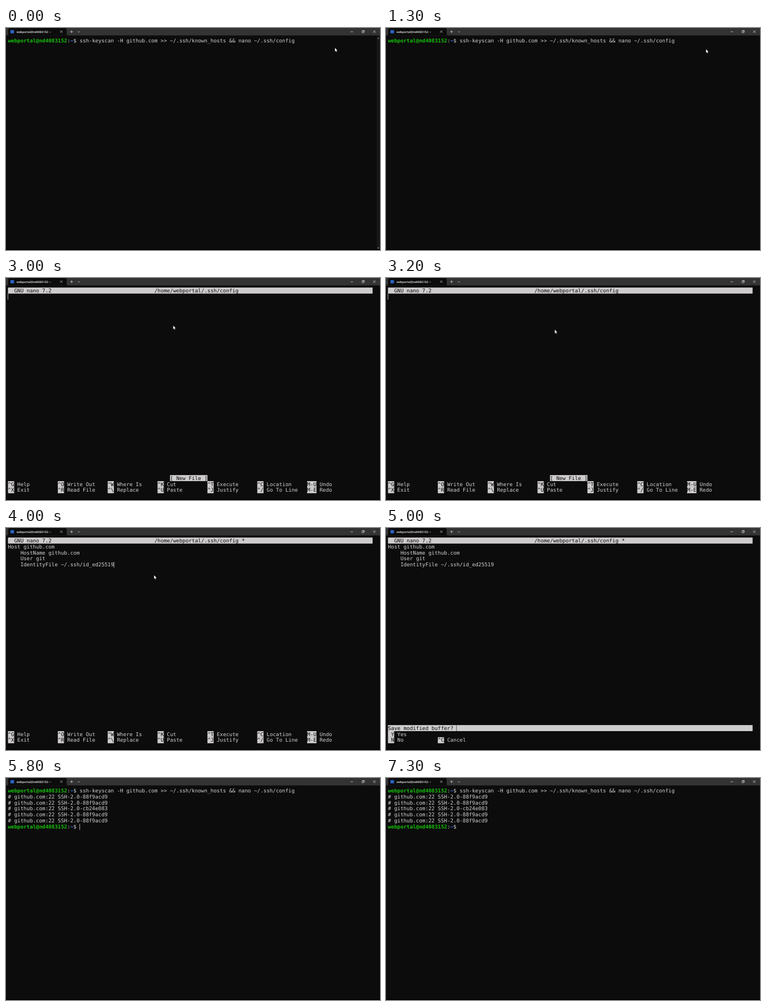
Recreate the animation shown at these times as an HTML page. Size 672 by 400 pixels, loop 8000 ms.

```html
<!DOCTYPE html>
<html lang="en">
<head>
<meta charset="utf-8">
<title>Terminal</title>
<style>
  html, body { margin: 0; width: 100%; height: 100%; overflow: hidden; background: #0c0c0c; }
  svg { display: block; width: 672px; height: 400px; }
  text { white-space: pre; text-rendering: geometricPrecision; }
  #screen text { font: 9.3015px "DejaVu Sans Mono", monospace; font-variant-ligatures: none; }
  #screen .bold { font-weight: 700; }
  #title { font: 600 5.1px "Open Sans", sans-serif; }
  .icon { fill: none; stroke: #e6e6e6; stroke-width: .7; }
</style>
</head>
<body>
<svg viewBox="0 0 672 400">
  <rect width="672" height="400" fill="#0c0c0c"/>
  <rect y="398.5" width="672" height="1.5" fill="#000"/>
  <rect width="672" height="13.4" fill="#333"/>
  <path d="M1 13.4Q4 13.4 4 10.4V3Q4 0 7 0H106Q109 0 109 3V10.4Q109 13.4 112 13.4Z" fill="#0c0c0c"/>
  <rect x="8" y="3.8" width="6.4" height="5.8" fill="#2b64c4"/>
  <text id="title" x="19" y="8.7" fill="#fff"></text>
  <path class="icon" d="M97.4 4.6l4 4m0-4l-4 4M115.3 6.7h5m-2.5-2.5v5M129.2 6l1.8 1.8 1.8-1.8M619 6.8h4.6M639.6 5.4h3.2v3.2h-3.2zM640.8 5.2v-.8h3v3h-.8M659.6 4.4l4.4 4.4m0-4.4l-4.4 4.4"/>
  <g id="bar">
    <rect x="666" y="13.4" width="6" height="385" fill="#171717"/>
    <path d="M667.3 19.4l1.7-2.4 1.7 2.4zM667.3 395.6l1.7 2.4 1.7-2.4z" fill="#8a8a8a"/>
  </g>
  <g id="screen"></g>
  <path id="mouse" d="M0 0V6.7L1.5 5.3 2.5 7.7 3.6 7.2 2.6 4.9H4.7Z" fill="#fff" stroke="#222" stroke-width=".25"/>
</svg>
<script>
const LOOP = 8000, STEP = 100;
const LEFT = 3.5, TOP = 17.2, CELL = 5.6, ROW = 10.9, COLS = 117;
const FG = '#d2d2d2', BG = '#0c0c0c', PANEL = '#cfccce', GREEN = '#16c00c', BLUE = '#3b78ff';
const USER = 'webportal', HOST = 'nd4083152';
const FILE = `/home/${USER}/.ssh/config`;
const COMMAND = 'ssh-keyscan -H github.com >> ~/.ssh/known_hosts && nano ~/.ssh/config';

const $ = id => document.getElementById(id);
const screen = $('screen'), mouse = $('mouse'), bar = $('bar');
$('title').textContent = `${USER}@${HOST}: ~`;

function add(tag, attrs, content = '') {
  const el = document.createElementNS('http://www.w3.org/2000/svg', tag);
  for (const name in attrs) el.setAttribute(name, attrs[name]);
  el.textContent = content;
  screen.append(el);
}
const colX = col => LEFT + col * CELL;
const rowY = row => TOP + row * ROW;

function put(row, col, text, fill = FG, style = '') {
  add('text', { x: colX(col), y: rowY(row) + 8.5, fill, class: style }, text);
}
function fill(row, col, count) {
  add('rect', { x: colX(col), y: rowY(row), width: count * CELL, height: ROW, fill: PANEL });
}
function invert(row, col, text) {
  fill(row, col, text.length);
  put(row, col, text, BG);
}
function caret(row, col, color = FG) {
  add('rect', { x: colX(col) - .3, y: rowY(row), width: .8, height: ROW, fill: color });
}

function prompt(row) {
  put(row, 0, `${USER}@${HOST}`, GREEN, 'bold');
  put(row, 19, ':');
  put(row, 20, '~', BLUE, 'bold');
  put(row, 21, '$');
}
function shell(lines) {
  prompt(0);
  put(0, 23, COMMAND);
  for (let i = 1; i <= lines; i++)
    put(i, 0, '# github.com:22 SSH-2.0-' + (i === 3 ? 'cb24e083' : '88f9acd9'));
}

// Each entry: key and label, listed in column pairs.
function shortcuts(list, width) {
  list.forEach(([key, label], i) => {
    const row = 32 + i % 2, col = (i >> 1) * width;
    invert(row, col, key);
    put(row, col + key.length + 1, label);
  });
}
const EDIT_KEYS = [
  ['^G', 'Help'], ['^X', 'Exit'], ['^O', 'Write Out'], ['^R', 'Read File'],
  ['^W', 'Where Is'], ['^\\', 'Replace'], ['^K', 'Cut'], ['^U', 'Paste'],
  ['^T', 'Execute'], ['^J', 'Justify'], ['^C', 'Location'], ['^/', 'Go To Line'],
  ['M-U', 'Undo'], ['M-E', 'Redo']
];
const WRITE_KEYS = [
  ['^G', 'Help'], ['^C', 'Cancel'], ['M-D', 'DOS Format'], ['M-M', 'Mac Format'],
  ['M-A', 'Append'], ['M-P', 'Prepend'], ['M-B', 'Backup File'], ['^T', 'Browse']
];

function nano(edited) {
  fill(0, 0, COLS);
  put(0, 2, 'GNU nano 7.2', BG);
  put(0, 47, FILE + (edited ? ' *' : ''), BG);
  if (!edited) return;
  put(1, 0, 'Host github.com');
  put(2, 4, 'HostName github.com');
  put(3, 4, 'User git');
  put(4, 4, 'IdentityFile ~/.ssh/id_ed25519');
}
function ask(text) {
  fill(31, 0, COLS);
  put(31, 0, text, BG);
  caret(31, text.length, '#444');
}

const output = lines => () => { shell(lines); caret(lines + 1, 0); };
const finished = blink => () => { shell(5); prompt(6); if (blink) caret(6, 23); };

const SCENES = [
  [0, () => shell(0)],
  [1800, output(0)],
  [2000, output(1)],
  [2200, output(2)],
  [2300, output(3)],
  [2500, output(4)],
  [2600, output(5)],
  [3000, () => { nano(false); invert(31, 52, '[ New File ]'); shortcuts(EDIT_KEYS, 16); caret(1, 0); }],
  [4000, () => { nano(true); shortcuts(EDIT_KEYS, 16); caret(4, 34); }],
  [5000, () => {
    nano(true);
    ask('Save modified buffer? ');
    shortcuts([[' Y', 'Yes'], [' N', 'No']], 16);
    invert(33, 16, '^C');
    put(33, 19, 'Cancel');
  }],
  [5200, () => { nano(true); ask('File Name to Write: ' + FILE); shortcuts(WRITE_KEYS, 29); }],
  [5800, finished(true)],
  [7200, finished(false)]
];

// Pointer stops: time, x, y; a stop without a place hides it.
const STOPS = [
  [0, 591, 35.7], [700, 591, 35.7], [800, 587.5, 35.7], [1200, 587.5, 35.7],
  [1500, 550, 43], [1700, 550, 43], [2100, 388.3, 71.3], [2600, 301, 82],
  [2700, 299, 82], [2900, 299, 82], [3200, 303.2, 93], [3400, 294.5, 97],
  [3500, 294.5, 97], [3800, 266, 85], [4900, 266, 85], [5000],
  [6200, 395, 136], [6400, 615, 209], [6500]
];

const last = (list, t) => list.findLastIndex(item => item[0] <= t);

function movePointer(t) {
  const i = last(STOPS, t), [t0, x0, y0] = STOPS[i];
  mouse.style.display = x0 === undefined ? 'none' : '';
  if (x0 === undefined) return;
  const [t1, x1 = x0, y1 = y0] = STOPS[i + 1];
  const k = (t - t0) / (t1 - t0);
  mouse.setAttribute('transform', `translate(${x0 + (x1 - x0) * k} ${y0 + (y1 - y0) * k})`);
}

let shown = -1;
function frame() {
  const t = Math.floor(performance.now() % LOOP / STEP) * STEP;
  const scene = last(SCENES, t);
  if (scene !== shown) {
    screen.replaceChildren();
    SCENES[scene][1]();
    shown = scene;
  }
  bar.setAttribute('opacity', Math.max(0, Math.min(1, 1 - t / 500)));
  movePointer(t);
  requestAnimationFrame(frame);
}
frame();
</script>
</body>
</html>
```
